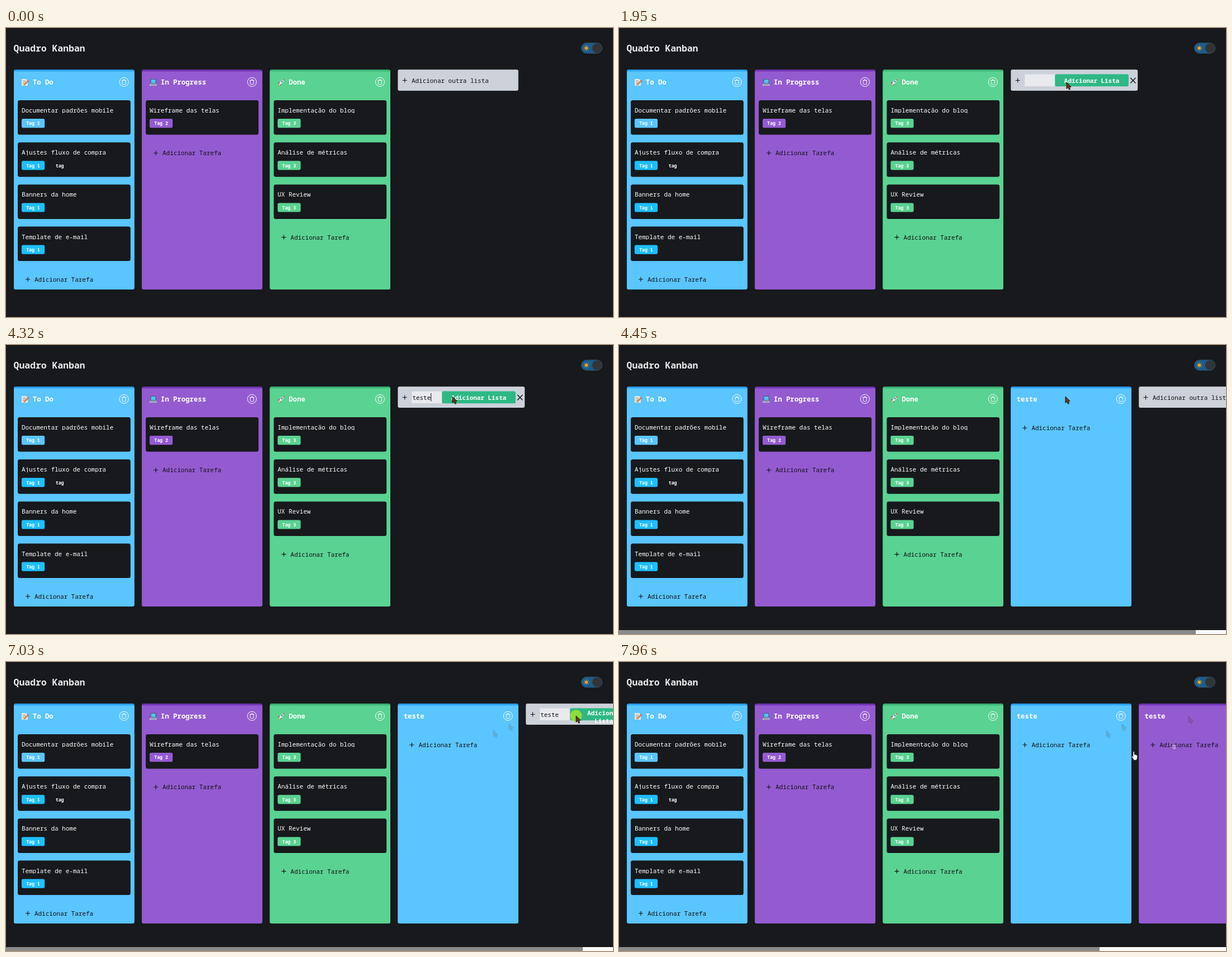
Animation of 1085 by 516 pixels, one loop 8000 ms. Source, as an HTML page:

```html
<!DOCTYPE html>
<html lang="pt-BR">
<head>
<meta charset="utf-8">
<title>Quadro Kanban</title>
<style>
  html, body { margin: 0; width: 100%; height: 100%; overflow: hidden; background: #17191c; }
  svg { display: block; width: 100vw; height: 100vh; }
  text { font: 10.94px "Roboto Mono", "Noto Sans Mono", monospace; fill: #101214; white-space: pre; }
  .page { font-size: 16.4px; font-weight: 600; fill: #e9eaec; }
  .head { font-size: 12.31px; font-weight: 700; fill: #fff; }
  .card { fill: #fff; }
  .tag { font-size: 8.2px; font-weight: 700; fill: #fff; }
  .action { font-weight: 700; fill: #fff; }
  .line { fill: none; stroke: #101214; stroke-width: 1.1; }
  .white { stroke: #fff; stroke-width: 1; }
</style>
</head>
<body>
<svg id="stage" viewBox="0 0 1085 516">
  <defs>
    <g id="trash" class="line white">
      <circle r="8"/>
      <path d="M-4-2.8H4M-1.4-2.8V-4.2H1.4V-2.8M-3-2.8V3.2Q-3 4.2-2 4.2H2Q3 4.2 3 3.2V-2.8" stroke-width=".9"/>
    </g>
    <path id="plus" class="line" d="M-4 0H4M0-4V4"/>
    <g id="note">
      <path d="M1 1H9L12 4V13H1Z" fill="#e8e4dc"/>
      <path d="M3 4.5H8M3 7H9M3 9.5H7" stroke="#8b98a4" stroke-width=".9"/>
      <path d="M5 10L12 3L14 5L7 12L4.4 12.6Z" fill="#d08a3c"/>
      <path d="M12 3L14 5L13 6L11 4Z" fill="#d9596b"/>
    </g>
    <g id="laptop">
      <rect x="2.5" y="1" width="10" height="8.5" rx="1" fill="#43586a"/>
      <rect x="3.5" y="2" width="8" height="6.5" fill="#4fc3f0"/>
      <path d="M2.5 9.5H12.5L14 13H0Z" fill="#b4c3cf"/>
      <path d="M3 11H12" stroke="#647988"/>
    </g>
    <g id="rocket">
      <path d="M4 6L1 8.5L4 9ZM8 10L6 13L5.5 10Z" fill="#c9383f"/>
      <path d="M3 11L.5 13.5L4 12Z" fill="#f5a331"/>
      <path d="M3.5 10.5Q5 3.5 13 1Q11 9 4.5 11.5Z" fill="#dde3e8"/>
      <path d="M10 2.2L13 1L12 4.2Z" fill="#d9414a"/>
      <circle cx="8.6" cy="5.6" r="1.4" fill="#3f7fa8"/>
    </g>
    <path id="arrow" d="M0 0V11.4L2.7 9L4.6 13.3L6.6 12.4L4.8 8.2H8.2Z" stroke="#111" stroke-width=".9" stroke-linejoin="round" fill="#6e3616"/>
    <path id="hand" d="M-1.3 1Q0-.6 1.2 1V6Q2.5 5.2 3.3 6.3Q4.6 5.6 5.2 6.9Q6.9 6.6 6.9 8.4V11Q6.8 13 5.6 14.2V16H-.2V14.6L-3.6 10.2Q-4 8.3-2.4 8.8L-1.3 9.9Z" stroke="#111" stroke-width=".9" fill="#fff"/>
    <path id="ibeam" d="M-3-5.7Q0-6 0-4.5Q0-6 3-5.7M0-4.5V4.7M-3 5.9Q0 6.2 0 4.7Q0 6.2 3 5.9" fill="none" stroke="#111" stroke-width="1.6"/>
  </defs>
</svg>
<script>
const stage = document.getElementById('stage');
const STRIDE = 228.8, LOOP = 8000;
const colX = i => 14 + i * STRIDE;

const rect = (x, y, w, h, fill, rx = 0, extra = '') =>
  `<rect x="${x}" y="${y}" width="${w}" height="${h}" rx="${rx}" fill="${fill}" ${extra}/>`;
const text = (x, y, str, cls = '', extra = '') => `<text x="${x}" y="${y}" class="${cls}" ${extra}>${str}</text>`;
const use = (id, x, y, extra = '') => `<use href="#${id}" x="${x}" y="${y}" ${extra}/>`;
const group = (id, body, x = 0) => `<g id="${id}" transform="translate(${x})">${body}</g>`;

const themes = {
  blue: ['#5bc5ff', '#2ba4f3'],
  purple: ['#945bd1', '#7434b6'],
  green: ['#5ad292', '#3db777']
};

function card(y, title, tag, color, extraTag = '') {
  return rect(7, y, 201.6, 61.5, '#17191c', 3.5) +
    text(13.9, y + 21.9, title, 'card') +
    rect(13, y + 23.2, 188, 5, '#17191c') +
    rect(13.9, y + 33, 41.2, 16.2, color, 2.8) +
    text(22.2, y + 44.4, tag, 'tag') + text(74.8, y + 44.4, extraTag, 'tag');
}

function column(i, theme, title, icon, cards = [], tag = '', tagColor) {
  const [fill, edge] = themes[theme];
  const addY = 148 + cards.length * 75.2;
  const body = rect(0, 74.3, 215.4, 392.4, edge, 3) +
    `<path d="M0 77.6H215.4V463.7Q215.4 466.7 212.4 466.7H3Q0 466.7 0 463.7Z" fill="${fill}"/>` +
    (icon ? use(icon, 13, 90) : '') +
    text(icon ? 33.8 : 10.3, 101.2, title, 'head') +
    use('trash', 196.8, 96.4) +
    cards.map(([name, extra], k) =>
      card(129 + k * 75.2, name, tag, k && tagColor || fill, extra)).join('') +
    use('plus', 25, addY) + text(37, addY + 4, 'Adicionar Tarefa');
  return group('col' + i, body, colX(i));
}

const addList = rect(0, 74.3, 215.4, 37.6, '#cdd1d9', 3) +
  use('plus', 12.3, 93.5) + text(24.6, 97.6, 'Adicionar outra lista');

const form = (width, labels) =>
  rect(0, 74.3, width, 37.6, '#cdd1d9', 3) + use('plus', 12.3, 93.5) +
  rect(25, 82.8, 53.4, 21.2, '#e8eaee', 1) +
  rect(79, 82.5, 131.5, 21.8, '#33cc94', 2.5, 'class="submit"') +
  labels +
  `<path class="line" d="M213.8 89L223 98.4M223 89L213.8 98.4" style="stroke-width:1.4"/>` +
  text(26, 97.6, '', 'typed') + rect(26, 86, 1, 14.5, '#111', 0, 'class="caret"');

const centered = 'text-anchor="middle"';
const sun = [...Array(8)].map((_, k) =>
  `<path d="M0-3.7V-5.2" transform="rotate(${k * 45})" stroke="#f4a51c" stroke-width="1.1"/>`).join('');

stage.innerHTML += [
  text(13.6, 42.3, 'Quadro Kanban', 'page'),
  rect(1028.3, 26.7, 37.4, 18.6, '#1b5c8d', 9.3, 'stroke="#39505f" stroke-width=".8"'),
  '<circle cx="1056.6" cy="36" r="8.7" fill="#333436"/>',
  `<g transform="translate(1037.3 36)"><circle r="2.8" fill="#f4a51c"/>${sun}</g>`,
  column(0, 'blue', 'To Do', 'note', [
    ['Documentar padrões mobile'], ['Ajustes fluxo de compra', 'tag'],
    ['Banners da home'], ['Template de e-mail']], 'Tag 1', '#1fbfff'),
  column(1, 'purple', 'In Progress', 'laptop', [['Wireframe das telas']], 'Tag 2'),
  column(2, 'green', 'Done', 'rocket', [
    ['Implementação do blog'], ['Análise de métricas'], ['UX Review']], 'Tag 3'),
  column(3, 'blue', 'teste'),
  column(4, 'purple', 'teste'),
  group('add3', addList, colX(3)),
  group('add4', addList, colX(4)),
  group('form3', form(226.8, text(144.7, 97.6, 'Adicionar Lista', 'action', centered)), colX(3)),
  group('form4', form(240, text(139.4, 94.6, 'Adicionar', 'action', centered) +
    text(139.4, 108.6, 'Lista', 'action', centered)), colX(4)),
  group('scroll', rect(0, 509, 1085, 7, '#fafafa') + rect(0, 509, 1031, 7, '#8a8a8a', 0, 'id="thumb"')),
  group('trail0', use('arrow', 871, 122, 'opacity=".16"')),
  group('trail1', use('arrow', 899, 110, 'opacity=".14"')),
  group('trail2', use('arrow', 1018, 97, 'opacity=".25"') + use('hand', 990, 141, 'opacity=".3"')),
  '<circle id="click" r="10.5" fill="#96e034" opacity=".92"/>',
  '<use id="cursor"/>'
].join('');

const $ = id => document.getElementById(id);
const within = (t, spans) => spans.some(([a, b]) => t >= a && t < b);
const show = (id, on) => $(id).setAttribute('display', on ? 'inline' : 'none');

// start, end, steps, x, y, pointer on arrival
const moves = [
  [190, 730, 9, 815, 106, 'hand'],
  [1210, 1210, 1, 812, 106.5, 'hand'],
  [1280, 1280, 1, 812, 106, 'arrow'],
  [1350, 1950, 9, 800, 97, 'arrow'],
  [2360, 2630, 5, 760, 101, 'ibeam'],
  [4100, 4310, 4, 798, 92, 'arrow'],
  [4510, 4650, 3, 812, 100, 'arrow'],
  [4720, 4990, 5, 871, 122, 'arrow'],
  [5050, 5340, 5, 957.5, 98.5, 'hand'],
  [5550, 5550, 1, 958, 98, 'ibeam'],
  [5620, 5900, 5, 899, 111, 'arrow'],
  [5960, 6220, 5, 845, 121, 'arrow'],
  [6780, 6960, 4, 1019, 96, 'arrow'],
  [7440, 7650, 4, 990, 141, 'hand'],
  [7720, 7850, 3, 945, 165, 'hand'],
  [7900, 7960, 2, 920, 159.3, 'hand']
];
const clicks = [[870, 940], [2780, 2830], [4380, 4450], [5410, 5480], [7030, 7100]];
const carets = [[1280, 1810], [2360, 2630], [2970, 4380], [5550, 6080], [6430, 6960]];
const keys = { form3: [3500, 3650, 3860, 3930, 4000], form4: [6430, 6500, 6570, 6640, 6710] };

function pointerAt(t) {
  let x = 1080, y = 560, kind = 'arrow';
  for (const [a, b, n, tx, ty, next] of moves) {
    if (t < a) break;
    const step = b > a ? Math.min(n, Math.floor((t - a) / (b - a) * (n - 1) + 1e-6) + 1) : n;
    x += (tx - x) * step / n;
    y += (ty - y) * step / n;
    if (step === n) kind = next;
  }
  return { x, y, kind };
}

function drawForm(id, left, t, p) {
  const el = $(id);
  const count = keys[id].filter(k => t >= k).length;
  const over = p.x > left + 79 && p.x < left + 210 && p.y > 82 && p.y < 104.5;
  el.querySelector('.submit').setAttribute('fill', over ? '#2eb885' : '#33cc94');
  el.querySelector('.typed').textContent = 'teste'.slice(0, count);
  const caret = el.querySelector('.caret');
  caret.setAttribute('x', 26 + count * 6.565);
  caret.setAttribute('display', within(t, carets) ? 'inline' : 'none');
}

function render(t) {
  const p = pointerAt(t);
  show('add3', t < 1280);
  show('form3', t >= 1280 && t < 4450);
  show('col3', t >= 4450);
  show('add4', t >= 4450 && t < 5550);
  show('form4', t >= 5550 && t < 7100);
  show('col4', t >= 7100);
  show('scroll', t >= 4450);
  $('thumb').setAttribute('width', t < 7100 ? 1031 : 859);
  drawForm('form3', colX(3), t, p);
  drawForm('form4', colX(4), t, p);
  show('trail0', t >= 5050);
  show('trail1', t >= 5960);
  show('trail2', t >= 7720);
  const place = `translate(${p.x} ${p.y})`;
  show('click', within(t, clicks));
  $('click').setAttribute('transform', place);
  $('cursor').setAttribute('href', '#' + p.kind);
  $('cursor').setAttribute('transform', place);
}

const begin = performance.now();
function tick() {
  render((performance.now() - begin) % LOOP);
  requestAnimationFrame(tick);
}
tick();
</script>
</body>
</html>
```
